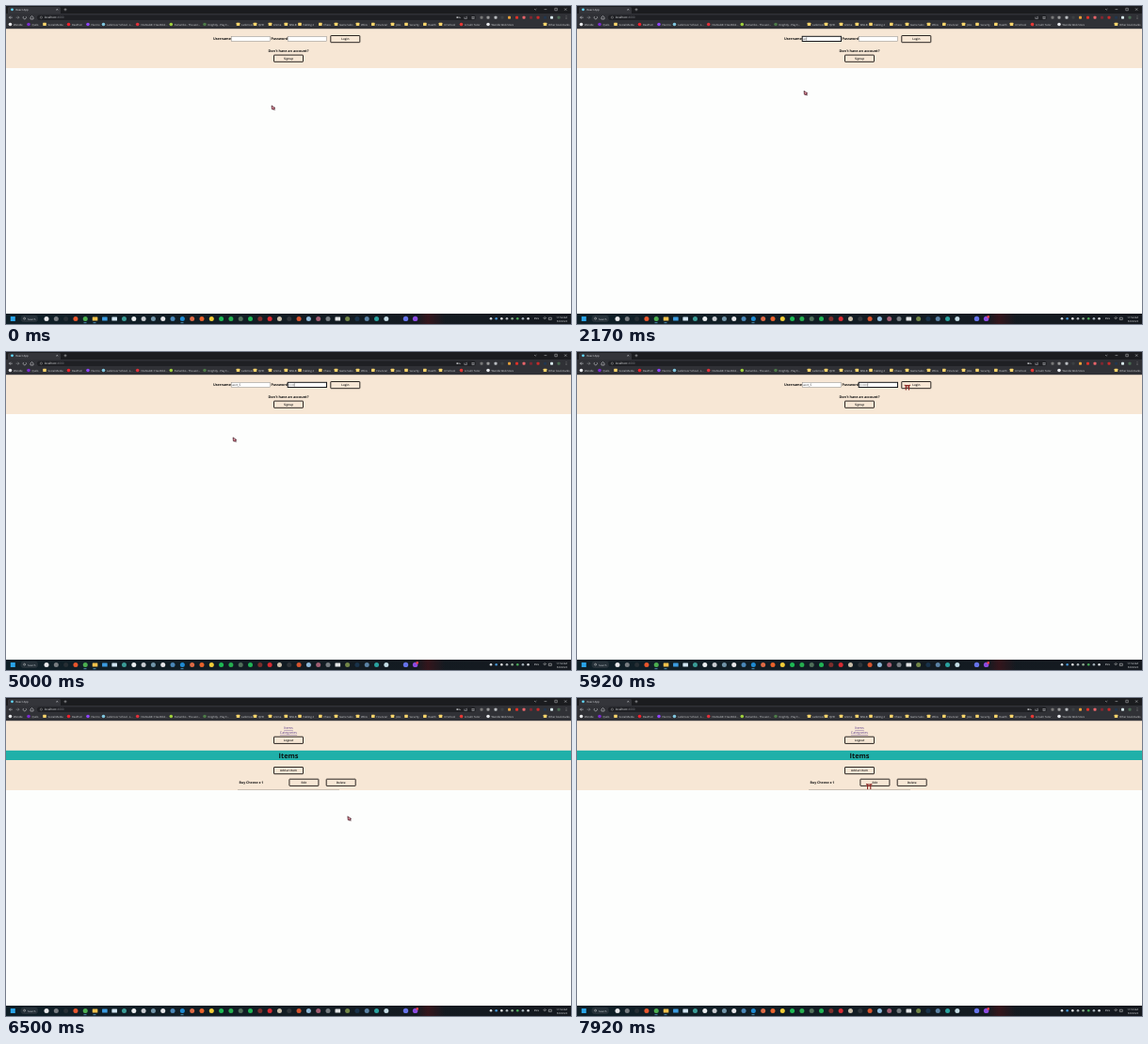
Write an HTML page that moves like this. It is 600 px wide and 338 px high and loops after 8 s.

```html
<!DOCTYPE html>
<html lang="en">
<head>
<meta charset="utf-8">
<title>React App</title>
<style>
  html, body { margin: 0; width: 100%; height: 100%; overflow: hidden; background: #fdfefd; }
  svg { display: block; width: 600px; height: 338px; }
  text { font-family: "Open Sans", "Noto Sans", sans-serif; text-rendering: geometricPrecision; white-space: pre; }
</style>
</head>
<body>
<svg id="stage" viewBox="0 0 600 338"></svg>
<script>
const LOOP = 8000, FRAME = 1000 / 12;
const BEIGE = '#f7e7d5';

const rect = (x, y, w, h, fill, more = '') =>
  `<rect x="${x}" y="${y}" width="${w}" height="${h}" fill="${fill}" ${more}/>`;
const dot = (x, y, r, fill, more = '') => `<circle cx="${x}" cy="${y}" r="${r}" fill="${fill}" ${more}/>`;
const line = (d, color = '#c9cbce', width = 0.6) =>
  `<path d="${d}" fill="none" stroke="${color}" stroke-width="${width}"/>`;
const text = (x, y, str, size, fill, more = '') =>
  `<text x="${x}" y="${y}" font-size="${size}" fill="${fill}" ${more}>${str}</text>`;
const BOLD = 'font-weight="700"';
const MID = 'text-anchor="middle"';

const button = (x, y, label, id = '') =>
  rect(x + 0.5, y + 0.5, 31, 7.2, BEIGE, 'rx=".4" stroke="#2b2622" stroke-width="1"') +
  text(x + 16, y + 5.1, label, 3.1, '#111', `${MID} font-weight="600" ${id && `id="${id}"`}`);

const input = (x, id) =>
  rect(x, 32.3, 41.3, 5.2, '#fff', `id="${id}" stroke="#8a8580" stroke-width=".5"`);

function browserChrome() {
  const folder = x => rect(x - 1.8, 17.8, 3.6, 3.2, '#f6d36b', 'rx=".4"');
  const sites = [
    [4.5, '#e9eaec', 'Wendle'], [24, '#7b2bd0', 'Quilo'], [41, '', 'Social Media'],
    [66.5, '#f0202a', 'ReelPod'], [87, '#9146ff', 'Flurmo'], [103.5, '#7fc4dd', 'Larkmoor School - L…'],
    [139.7, '#e0303a', 'CiteNub®: Free Bibli…'], [175.3, '#9fcf3c', 'Parlumbo - The wor…'],
    [211, '#4d7a48', 'Knightly - Play C…'], [246.5, '', 'Larkmoor'], [264.5, '', 'QVD'], [280.5, '', 'Anime'],
    [297.3, '', 'WGLB'], [312, '', 'Fabling 2'], [333.8, '', 'Chess'], [350.5, '', 'Game Subs'],
    [373.5, '', 'Wikis'], [389.8, '', 'Financial'], [410.5, '', 'Jobs'], [425, '', 'Security'],
    [444.8, '', 'Health'], [461.5, '', 'UI School'], [483.5, '#e53935', 'A Calm Tutor'],
    [512, '#e8eaed', 'Wendle Web Store'], [572.5, '', 'Other bookmarks']
  ];
  const extensions = [
    [505, '#777'], [512, '#999'], [520, '#b9bcc0'], [527, '#3c4043'], [534.5, '#e5a13a'], [542.5, '#e03028'],
    [550, '#e8646a'], [557.5, '#7f2730'], [565, '#c92a2a'], [572.5, '#22364e'], [579.5, '#d8e8ea'], [587, '#4a6b52']
  ];
  return rect(0, 0, 600, 8, '#1b1c1f') +
    rect(2, 1, 56, 8, '#34353a', 'rx="1.5"') +
    rect(0, 8, 600, 16.2, '#303136') +
    dot(6.5, 3.8, 1.4, '#61dafb') +
    text(10.5, 4.9, 'React App', 2.8, '#dfe1e5') +
    line('M53.5 3l1.6 1.6m0-1.6l-1.6 1.6M61.5 3.8h3m-1.5-1.5v3', '#c9cbce', .5) +
    line('M561 3l1.2 1.2L563.4 3M571.5 3.6h2.8M582.8 2.3h2.5v2.5h-2.5zM593 2.4l2.4 2.4m0-2.4l-2.4 2.4', '#d5d7da', .45) +
    rect(33, 9.4, 466, 5.6, '#1f2024', 'rx="2.8"') +
    line('M6.8 12.2H3.4m1.5-1.5l-1.5 1.5l1.5 1.5M18.5 11.1a1.7 1.7 0 1 0 2.8.2M26 12l1.5-1.5L29 12v2h-3z') +
    line('M10.6 12.2H14m-1.5-1.5l1.5 1.5l-1.5 1.5', '#8b8d91') +
    dot(37.4, 12.2, 1.1, 'none', 'stroke="#aaa" stroke-width=".45"') +
    text(40.7, 13.3, 'localhost<tspan fill="#85888d">:4000</tspan>', 3.1, '#e8eaed') +
    `<g id="key">${dot(479.2, 12.1, .9, '#c9cbce')}${line('M480 12.1h2.2v1')}</g>` +
    line('M486.8 11.5v2h2.6v-2M488 12.6l1.5-1.8M495 11l1 1.4l1.1-1.4v3l-1.1-.8l-1 .8z', '#b5b7ba', .5) +
    extensions.map(([x, c]) => rect(x - 1.5, 10.7, 3, 3, c, 'rx=".8"')).join('') +
    [10.8, 12.2, 13.6].map(y => dot(595, y, .4, '#ccc')).join('') +
    sites.map(([x, c, name]) => (c ? dot(x, 19.5, 1.8, c) : folder(x)) +
      text(x + 3.5, 20.6, name, 2.75, '#dcdee1')).join('');
}

function taskbar() {
  const icons = ('e8e8ea 777c80 272e34 e8562c 4caf50 f2c14b 3c9be0 cfe3ef 3b9c96 e9ecee c8cbd0 7194a8 e5e5e8 ' +
    '4a87b8 1f8ad2 dd6a45 e8622b f2cd38 1db954 25ae4f 50705a 20b455 7d2e2c d92b32 c9bda9 30353a ' +
    'd6542e 8fb9d9 a25f73 777d82 e1e4e5 738748 19334b 5b83a5 2aa3a0 c4dce5').split(' ');
  const wide = new Set([5, 6, 7, 30]);
  const tray = ['#d5dce0', '#4595d4', '#e8e8e8', '#aeb5b9', '#8fae92', '#49ab57', '#a3afb6', '#d8dcde'];
  return rect(0, 327, 600, 11, 'url(#bar)') +
    rect(436, 327, 30, 11, 'url(#glow)') +
    rect(4.8, 330, 5, 5, '#2aa4e8') +
    rect(15.5, 328.8, 18.5, 7.2, '#253038', 'rx="3.4"') +
    dot(19.6, 332.2, 1, 'none', 'stroke="#ddd" stroke-width=".5"') +
    text(23, 333.6, 'Search', 2.7, '#d5dade') +
    icons.map((c, i) => {
      const x = 43 + i * 10.31;
      return wide.has(i) ? rect(x - 2.8, 330.4, 5.6, 4.2, '#' + c, 'rx=".5"') : dot(x, 332.4, 2.5, '#' + c);
    }).join('') +
    [84, 94, 187].map(x => rect(x - 1.5, 336.4, 3, .7, '#65b9e6')).join('') +
    dot(424.5, 332.4, 2.7, '#6673e8') + dot(434.6, 332.4, 2.7, '#8b4be0') +
    `<g id="badge">${dot(436.7, 330.4, 1.3, '#e8404c')}</g>` +
    tray.map((c, i) => dot(515 + i * 5.65, 332.3, 1.3, c)).join('') +
    text(560.8, 333.3, 'ENG', 2.6, '#e4e6e8') +
    line('M570.5 331.6q1.7-1.5 3.4 0m-2.6 1.1q.9-.8 1.8 0M576.3 331.2h3v2.2h-3z', '#ddd', .5) +
    text(596, 331.7, '', 2.7, '#e4e6e8', 'id="clock" text-anchor="end"') +
    text(596, 335.6, '5/8/2023', 2.7, '#e4e6e8', 'text-anchor="end"');
}

const loginPage = () => rect(0, 24, 600, 42, BEIGE) +
  text(220, 36.3, 'Username:', 3.7, '#111', BOLD) + input(239.2, 'userBox') +
  text(281.5, 36.3, 'Password:', 3.7, '#111', BOLD) + input(299.2, 'passBox') +
  text(240.3, 36, '', 3.1, '#222', 'id="userText"') +
  '<g id="dots"></g>' + line('', '#111', .4).replace('<path', '<path id="caret"') +
  button(344.3, 31, 'Login', 'loginLabel') +
  text(300, 48.8, 'Don\'t have an account?', 3.7, '#111', BOLD + MID.padStart(MID.length + 1)) +
  button(284, 51.6, 'Signup');

const itemsPage = () => rect(0, 24, 600, 74, BEIGE) +
  text(300, 33.2, 'Items', 3.7, '#60408d', MID + ' text-decoration="underline"') +
  text(300, 38.2, 'Categories', 3.7, '#60408d', MID + ' text-decoration="underline"') +
  button(284, 40.7, 'Logout') +
  rect(0, 55.8, 600, 10.2, '#20b0a9') +
  text(300, 64, 'Items', 7.4, '#0b1514', `${MID} ${BOLD}`) +
  button(284, 73, 'Add an Item') +
  text(247.5, 91, 'Buy Cheese x 1', 3.5, '#111', BOLD) +
  button(300.4, 85.7, 'Edit') + button(339.7, 85.7, 'Delete') +
  rect(246, 97.3, 108, .6, '#aaa39b');

stage.innerHTML = `<defs>
  <linearGradient id="bar"><stop stop-color="#0f1f27"/><stop offset="1" stop-color="#15191f"/></linearGradient>
  <linearGradient id="glow"><stop stop-color="#4a1218" stop-opacity="0"/><stop offset=".4" stop-color="#4a1218" stop-opacity=".6"/>
    <stop offset="1" stop-color="#4a1218" stop-opacity="0"/></linearGradient></defs>
  ${rect(0, 0, 600, 338, '#fdfefd')}
  <g id="login">${loginPage()}</g><g id="items">${itemsPage()}</g>
  ${browserChrome()}${taskbar()}
  <g id="arrow"><path d="M-2-2.2L1.9.4L.6 1L1.6 2.3L-.3 2L-1.6 1.7z" fill="#b3475a" stroke="#3b2830" stroke-width=".6"/>
    <path d="M-1.1-1L.4.2L-.8.7z" fill="#f5dfe2"/></g>
  <g id="gate"><path d="M-3.2-2.4Q0-1.7 3.2-2.4M-2.4-.6H2.4M-1.6-2V3M1.6-2V3" fill="none" stroke="#8c2a26" stroke-width="1.1"/></g>`;

const $ = id => document.getElementById(id);
const show = (id, on) => $(id).setAttribute('display', on ? 'inline' : 'none');

// Pointer waypoints: time, x, y
const path = [
  [0, 284, 108], [500, 250, 40], [670, 246, 35], [1840, 243, 35], [2170, 243, 93], [5590, 243, 93],
  [5920, 352, 37], [6250, 358, 36], [6420, 366, 115.5], [6500, 364.8, 128], [6670, 364.8, 128],
  [6750, 366, 130], [6920, 366, 130], [7420, 262, 96], [7760, 262, 96], [7920, 311.2, 94], [LOOP, 311.2, 94]
];
const userKeys = [1920, 2170, 2340, 2420, 2750, 3000];
const passKeys = [4000, 4340, 4590, 4750, 5000, 5250, 5420];
const typed = (keys, t) => keys.filter(k => t >= k).length;

function pointerAt(t) {
  const i = Math.max(1, path.findIndex(p => p[0] >= t));
  const [t0, x0, y0] = path[i - 1], [t1, x1, y1] = path[i];
  const k = (t - t0) / (t1 - t0);
  return [x0 + (x1 - x0) * k, y0 + (y1 - y0) * k];
}

function focusBox(id, on) {
  $(id).setAttribute('stroke', on ? '#16181c' : '#8a8580');
  $(id).setAttribute('stroke-width', on ? 1 : .5);
}

function draw(now) {
  const t = now % LOOP;
  const loggedIn = t >= 6500, clicked = t >= 6170;
  const onUser = t >= 1170 && t < 3340, onPass = t >= 3340 && !clicked;
  const letters = typed(userKeys, t), bullets = typed(passKeys, t);

  show('login', !loggedIn);
  show('items', loggedIn);
  show('key', t < 1920 || t >= 4000);
  show('badge', t >= 340);
  focusBox('userBox', onUser);
  focusBox('passBox', onPass);
  $('userText').textContent = 'acct_5'.slice(0, letters);
  $('dots').innerHTML = Array.from({ length: bullets }, (_, i) => dot(300.7 + i * 1.2, 35, .43, '#333')).join('');
  $('loginLabel').textContent = clicked ? 'Loading...' : 'Login';
  $('clock').textContent = t < 6750 ? '11:54 AM' : '11:55 AM';

  const caretX = onPass ? 300.3 + bullets * 1.2 : 240.5 + $('userText').getComputedTextLength();
  $('caret').setAttribute('d', `M${caretX} 33.3v3.3`);
  show('caret', onUser || onPass);

  const [x, y] = pointerAt(Math.floor((t + 1) / FRAME) * FRAME);
  const overButton = loggedIn ? x > 300 && x < 332 && y > 85 && y < 96 : x > 344 && y < 40;
  const overInput = !loggedIn && x < 341 && y < 38;
  show('arrow', !overButton && !overInput);
  show('gate', overButton);
  for (const id of ['arrow', 'gate']) $(id).setAttribute('transform', `translate(${x} ${y})`);
}

function tick() {
  draw(performance.now());
  requestAnimationFrame(tick);
}
tick();
</script>
</body>
</html>
```
